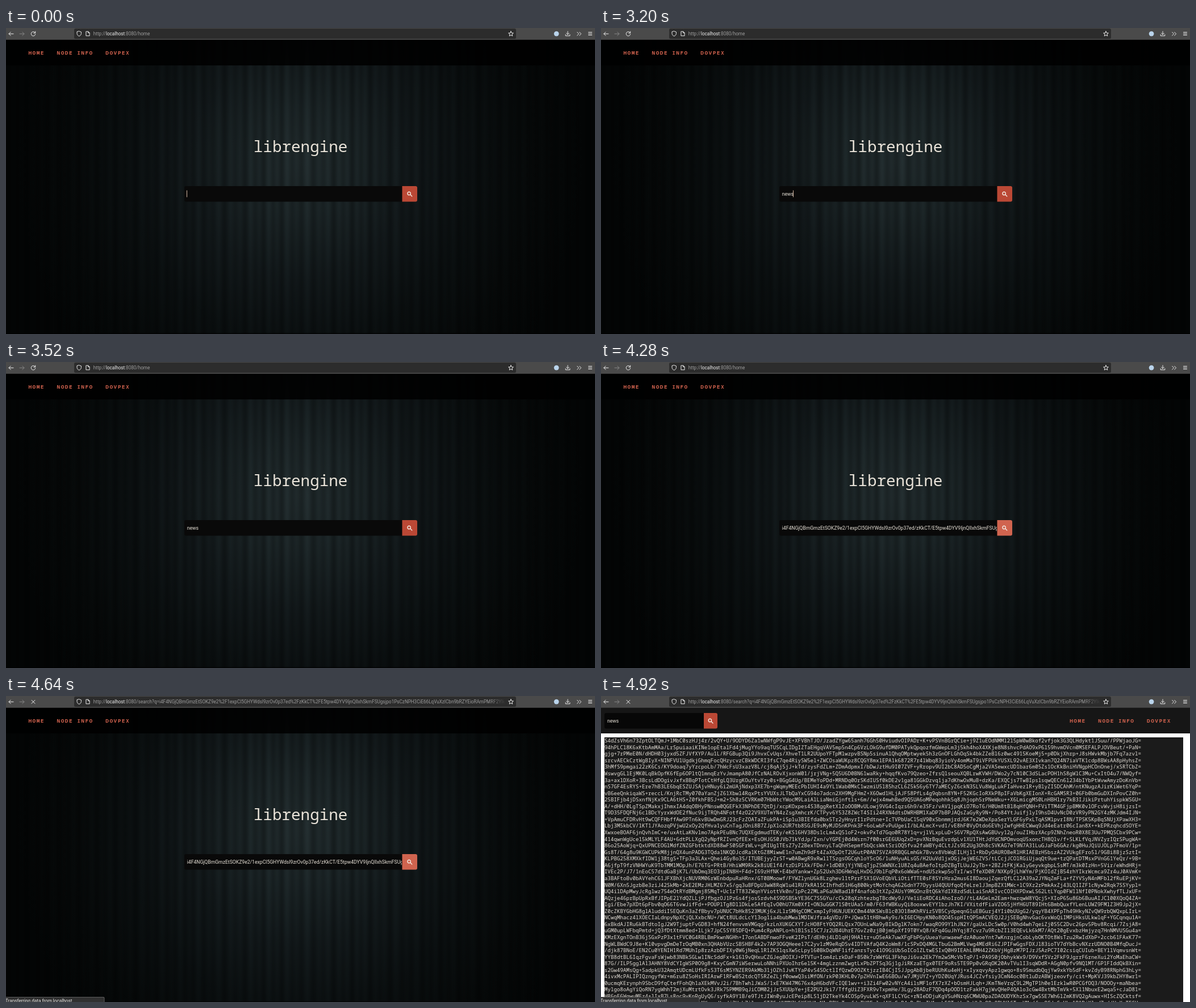
These frames come from a looping animation (1037 px wide and 540 px high, 8 s). An HTML page with a canvas:

```html
<!DOCTYPE html>
<html lang="en">
<head>
<meta charset="utf-8">
<title>librengine</title>
<style>
html, body { margin: 0; width: 100%; height: 100%; overflow: hidden; background: #000; }
canvas { display: block; width: 1037px; height: 540px; }
</style>
</head>
<body>
<canvas id="stage" width="1037" height="540"></canvas>
<script>
const W = 1037, H = 540, LOOP = 8000;
const ctx = document.getElementById('stage').getContext('2d');
const SANS = 'Roboto, sans-serif', MONO = '"Noto Sans Mono", monospace';
const CREAM = '#e9e3d9', RED = '#bb4835', RED_HOVER = '#d0644f', NAV = '#cd614d', ICON = '#ededed';
const TOKEN = ['i4F4NGjQBmGmzEtSOKZ9e2', '1expCl5GHYWdsI9zrOv0p37ed', 'zKkCT',
  'E5tpw4DYV9IjnQlIxhSkmFSUgsjpo1PsCzNPH3CiE66LqVuXzICbn9bRZYEioRAmPMRF2YIk'];
const NAV_ITEMS = ['HOME', 'NODE INFO', 'DOVPEX'];

function text(c, str, x, y, font, color, spacing = 0) {
  c.font = font;
  c.fillStyle = color;
  c.letterSpacing = spacing + 'px';
  c.fillText(str, x, y);
  return x + c.measureText(str).width;
}

function rect(c, x, y, w, h, color, radii = 0) {
  c.fillStyle = color;
  c.beginPath();
  c.roundRect(x, y, w, h, radii);
  c.fill();
}

function icon(c, x, y, path, color = ICON, width = 1) {
  c.save();
  c.translate(x, y);
  c.strokeStyle = color;
  c.lineWidth = width;
  c.lineCap = c.lineJoin = 'round';
  c.stroke(new Path2D(path));
  c.restore();
}

function layer(paint) {
  const canvas = document.createElement('canvas');
  canvas.width = W;
  canvas.height = H;
  paint(canvas.getContext('2d'));
  return canvas;
}

function random(seed) {
  return () => (seed = (seed * 1664525 + 1013904223) % 4294967296) / 4294967296;
}

function nav(c, x) {
  for (const item of NAV_ITEMS) {
    text(c, item, x, 47.4, '700 9.5px ' + MONO, NAV, 1.43);
    x += item.length * 7.13 + 21.6;
  }
}

function searchButton(c, x, y, w, color) {
  rect(c, x, y, w, 27.5, color, [0, 3, 3, 0]);
  icon(c, x + w / 2 - 1, y + 13, 'M2.6 0A2.7 2.7 0 1 1 -2.8 0A2.7 2.7 0 1 1 2.6 0M2.1 2.1L5 5', '#f2e8e0', 1.4);
}

function curtain(c) {
  c.fillStyle = '#040606';
  c.fillRect(0, 0, W, H);
  c.save();
  c.translate(518, 235);
  c.scale(1, 1.08);
  const glow = c.createRadialGradient(0, 0, 0, 0, 0, 500);
  [[0, '#253032'], [.18, '#1e282a'], [.38, '#141b1d'], [.6, '#0c1112'], [.82, '#070a0a'], [1, '#040606']]
    .forEach(([stop, color]) => glow.addColorStop(stop, color));
  c.fillStyle = glow;
  c.fillRect(-W, -H, 2 * W, 2 * H);
  c.restore();
  for (let x = 0; x < W; x++) {
    const fold = .5 + .3 * Math.sin(x * .364 + .9 * Math.sin(x * .041)) + .2 * Math.sin(x * .197 + 1);
    c.fillStyle = `rgba(0,0,0,${.32 * fold})`;
    c.fillRect(x, 0, 1, H);
  }
}

const home = layer(c => {
  curtain(c);
  rect(c, 0, 21, W, 45, 'rgba(0,0,0,.87)');
  rect(c, 0, 538, W, 2, 'rgba(0,0,0,.55)');
  nav(c, 39.4);
  c.textAlign = 'center';
  text(c, 'librengine', 518.6, 219.3, '27.6px ' + MONO, CREAM);
  c.textAlign = 'left';
  rect(c, 314, 279, 384, 27.5, '#090909', [3, 0, 0, 3]);
});

const results = layer(c => {
  rect(c, 0, 0, W, H, '#fff');
  rect(c, 0, 21, W, 45, '#161616');
  rect(c, 6, 30, 175, 27.5, '#070707', [3, 0, 0, 3]);
  text(c, 'news', 11, 47, '8.64px ' + SANS, CREAM);
  searchButton(c, 181, 30, 24, RED);
  nav(c, 825.2);
  rect(c, 6, 73, 1019, 467, '#1b1b1b');
  const upper = 'ABCDEFGHIJKLMNOPQRSTUVWXYZ';
  const alphabet = upper + upper.toLowerCase() + '0123456789+/';
  const next = random(128);
  for (let row = 0; row < 41; row++) {
    let line = '';
    while (line.length < 171) line += alphabet[Math.floor(next() * 64)];
    text(c, line + '=', 6, 82.2 + row * 11.56, '500 9.167px ' + MONO, '#e4dfd7');
  }
});

const toolbar = layer(c => {
  rect(c, 0, 0, W, 21, '#4a4a4a');
  rect(c, 0, 20, W, 1, '#3a3a3a');
  rect(c, 120, 1, 778, 18, '#2c2c2c', 2.5);
  icon(c, 9, 10.3, 'M4 0H-4M-.8 -3.2L-4 0L-.8 3.2');
  icon(c, 28, 10.3, 'M-4 0H4M.8 -3.2L4 0L.8 3.2', '#858585');
  icon(c, 128.7, 10, 'M0 -4.3L3.7 -3V-.4C3.7 2 2 3.6 0 4.4C-2 3.6 -3.7 2 -3.7 -.4V-3Z');
  icon(c, 144.2, 10, 'M-2.9 -3.8H.5L2.9 -1.4V3.8H-2.9ZM.5 -3.8V-1.4H2.9');
  let star = '';
  for (let i = 0; i < 10; i++) {
    const r = i % 2 ? 2.1 : 4.6, a = i * Math.PI / 5;
    star += (i ? 'L' : 'M') + r * Math.sin(a) + ' ' + -r * Math.cos(a);
  }
  icon(c, 889, 10.4, star + 'Z');
  rect(c, 964.7, 5.7, 8.8, 8.8, '#b9d3ea', 4.4);
  icon(c, 989, 10, 'M0 -4V1.5M-2.4 -.8L0 1.6L2.4 -.8M-3.8 1.6V3.8H3.8V1.6');
  icon(c, 1009, 10.3, 'M-3.4 -3L-.4 0L-3.4 3M.6 -3L3.6 0L.6 3');
  icon(c, 1028.5, 10, 'M-3 -2.5H3M-3 0H3M-3 2.5H3');
});

function addressBar(loading) {
  ctx.drawImage(toolbar, 0, 0, W, 21, 0, 0, W, 21);
  if (loading) icon(ctx, 48, 10.3, 'M-3 -3L3 3M3 -3L-3 3');
  else icon(ctx, 48, 10.3, 'M3 -2.4A3.8 3.8 0 1 0 3.8 .6M3.7 -4.2V-1.3H.8');
  const grey = ctx.createLinearGradient(850, 0, 880, 0);
  grey.addColorStop(0, '#9b9b9b');
  grey.addColorStop(1, 'rgba(155,155,155,0)');
  const font = '8.15px ' + SANS;
  const path = loading ? '/search?q=' + TOKEN.join('%2F') : '/home';
  ctx.save();
  ctx.beginPath();
  ctx.rect(150, 0, 730, 20);
  ctx.clip();
  let x = text(ctx, 'http://', 153.8, 13.2, font, grey);
  x = text(ctx, 'localhost', x, 13.2, font, '#f0f0f0');
  text(ctx, ':8080' + path, x, 13.2, font, grey);
  ctx.restore();
}

function status(message) {
  rect(ctx, -4, 531, 177.5, 14, '#5b5b5b', 2);
  rect(ctx, -4, 532, 176.5, 13, '#303030', 1.5);
  text(ctx, message + ' localhost…', -1, 541.4, '8.2px ' + SANS, '#f0f0f0');
}

function searchBox(t) {
  const query = t < 760 ? '' : t < 3200 ? 'n' : t < 4280 ? 'news' : TOKEN.join('/');
  ctx.save();
  ctx.beginPath();
  ctx.rect(318.5, 279, 378.5, 27);
  ctx.clip();
  const end = text(ctx, query, 318.7, 296, '8.64px ' + SANS, CREAM);
  ctx.restore();
  if (t < 3520) rect(ctx, Math.floor(end), 286.5, 1, 12, '#d5b9a4');
  searchButton(ctx, 697.5, 279, 26.5, t < 3960 ? RED : RED_HOVER);
}

function draw(t) {
  const loading = t >= 4440;
  if (t < 4760) {
    ctx.drawImage(home, 0, 0);
    searchBox(t);
  } else {
    ctx.drawImage(results, 0, 0);
  }
  addressBar(loading);
  if (loading) {
    const waiting = t < 4640 || (t >= 4760 && t < 4920);
    status(waiting ? 'Waiting for' : 'Transferring data from');
  }
}

const start = performance.now();
function frame() {
  draw((performance.now() - start) % LOOP);
  requestAnimationFrame(frame);
}
frame();
</script>
</body>
</html>
```
